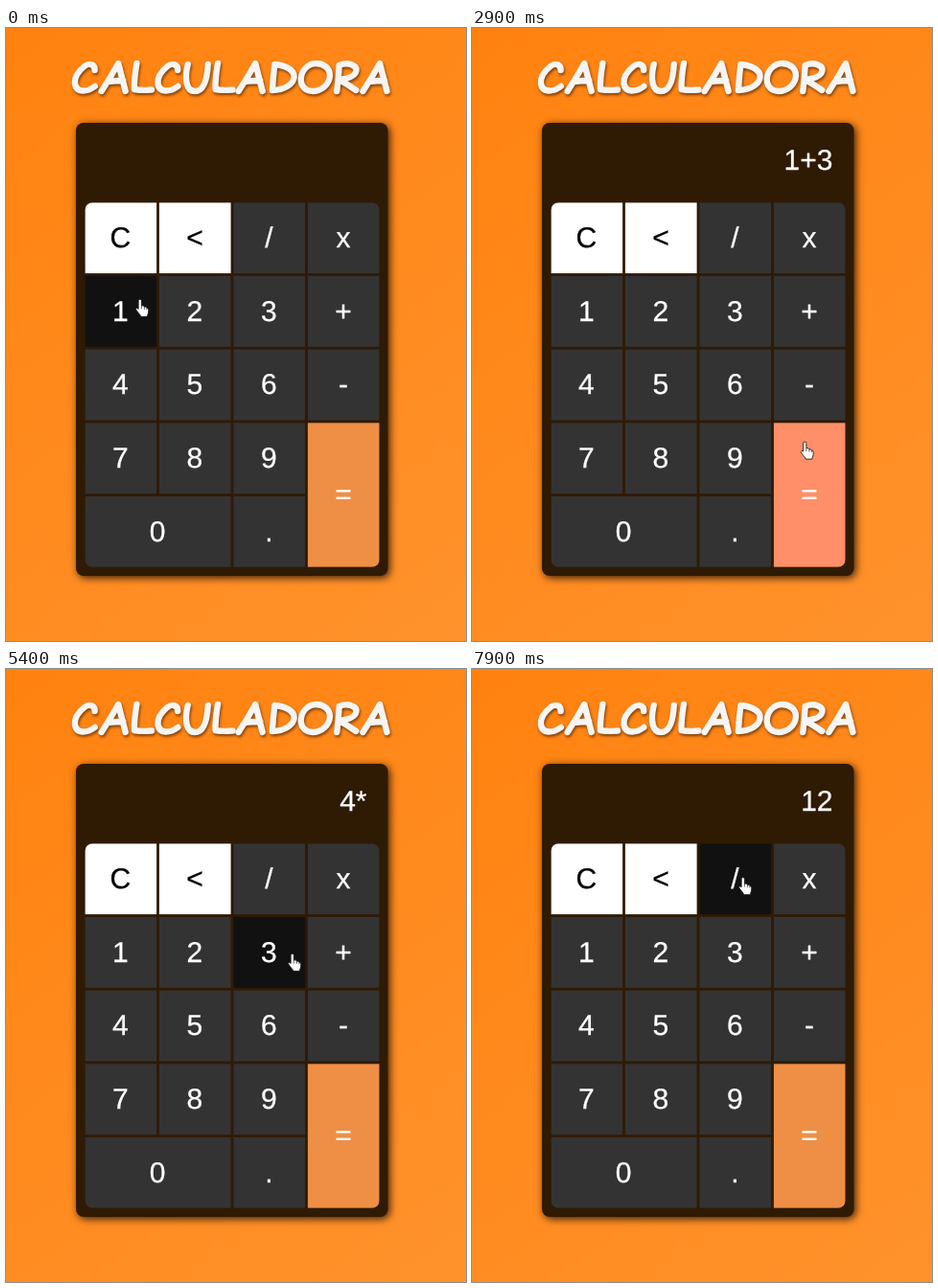
An HTML page for the animation above (8000 ms loop, 480 by 640 pixels).

```html
<!DOCTYPE html>
<html lang="pt">
<head>
<meta charset="utf-8">
<title>Calculadora</title>
<style>
  html, body { margin: 0; width: 100%; height: 100%; overflow: hidden; }
  body { background: linear-gradient(145deg, #ff820f, #ff922c); }
  svg { display: block; width: 480px; height: 640px; }
  text { font: 30px "Liberation Sans", Arial, sans-serif; color: #fff; fill: currentColor;
         stroke: currentColor; stroke-width: .3; text-anchor: middle; text-rendering: geometricPrecision; }
  #display { text-anchor: end; }
  #panel { fill: #2f1a04; filter: drop-shadow(2px 2px 4px rgba(0, 0, 0, .8)); }
  #title { fill: none; stroke: #f6f5f3; stroke-width: 6.4; stroke-linecap: round; stroke-linejoin: round;
           filter: drop-shadow(1px 2px 1.5px rgba(60, 25, 0, .65)); }
  #hand { fill: #fff; stroke: #1c1c1c; stroke-width: .9; stroke-linejoin: round; }
  #hand .folds { fill: none; stroke-width: .7; }
</style>
</head>
<body>
<svg viewBox="0 0 480 640">
  <defs><clipPath id="round"><rect x="82.4" y="182.2" width="307.4" height="380.6" rx="8"/></clipPath></defs>
  <g id="title" role="img" aria-label="CALCULADORA"></g>
  <rect id="panel" x="73" y="99" width="325.5" height="473" rx="8"/>
  <text id="display" x="376.5" y="147.7"></text>
  <g id="keys" clip-path="url(#round)"></g>
  <g id="hand">
    <path d="M-1.6 9.5V1a1.6 1.6 0 0 1 3.2 0V6q2.7-.4 3 1.2q2.2-.4 2.5 1.2q1.9-.1 1.9 2c0 4-1 4.8-1.5 7.1H1C.3 15-2.8 12.8-4.2 9.8Q-3.4 7.8-1.6 9.5Z"/>
    <path class="folds" d="M1.6 6V9.5M4.6 7.2V10M7.1 8.5V10.5"/>
  </g>
</svg>
<script>
const $ = id => document.getElementById(id);
function add(parent, tag, attrs) {
  const el = document.createElementNS("http://www.w3.org/2000/svg", tag);
  for (const name in attrs) el.setAttribute(name, attrs[name]);
  return parent.appendChild(el);
}

// Hand-lettered heading: advance width and pen stroke of each letter.
const letters = {
  C: [28.2, "M22 7C22 1 16-1 11 3C5 8 1 14 2 21C4 31 15 30 23 24"],
  A: [33.2, "M2 29Q11 14 18 0Q22 13 27 29M8 19Q16 18 24 18"],
  L: [25.2, "M4 0Q2 17 3 27Q11 28.5 21 27.5"],
  U: [31.2, "M4 1C1 17 4 29 13 29C23 29 25 15 25 1"],
  D: [31.2, "M5 1Q4 15 4 28C17 28 26 21 26 14C26 6 15 2 5 1"],
  O: [37.2, "M17 0C8 0 2 8 2 16C2 24 8 29 15 29C24 29 32 22 32 13C32 5 25 0 17 0Z"],
  R: [28.2, "M4 2Q4 17 3 29M4 2C13-2 23 2 22 8C21 14 13 16 5 17Q14 22 23 28"]
};
let penX = 71;
for (const c of "CALCULADORA") {
  const [advance, d] = letters[c];
  add($("title"), "path", { d, transform: `translate(${penX} 37) skewX(-3)` });
  penX += advance;
}

// A repeated label spans several cells.
const rows = ["C</x", "123+", "456-", "789=", "00.="];
const pitchX = 77.5, pitchY = 76.7, gap = 2.8;
const keys = {};
rows.forEach((labels, row) => [...labels].forEach((label, col) => {
  const key = keys[label] ??= { col, row };
  key.x = 82.4 + key.col * pitchX;
  key.y = 182.2 + key.row * pitchY;
  key.width = (col - key.col + 1) * pitchX - gap;
  key.height = (row - key.row + 1) * pitchY - gap;
}));
for (const label in keys) {
  const key = keys[label], { x, y, width, height } = key;
  const light = label === "C" || label === "<";
  key.colors = light ? ["#fff", "#ddd"] : label === "=" ? ["#ee8f45", "#ff8f68"] : ["#333", "#111"];
  key.rect = add($("keys"), "rect", { x, y, width, height });
  key.cx = x + width / 2;
  key.cy = y + height / 2;
  const text = add($("keys"), "text", { x: key.cx - .3, y: key.cy + 9.8 });
  text.textContent = label;
  if (light) text.style.color = "#000";
}

const TRAVEL = 500, PRESS_DELAY = 200;
const stop = (label, at, dx, dy, press = true) =>
  ({ label, at, press, x: keys[label].cx + dx, y: keys[label].cy + dy });
const stops = [
  stop("1", 0, 20, -12), stop("+", 1000, -6, -4), stop("3", 1900, 14, 0),
  stop("=", 2900, -5, -55), stop("/", 4300, -22, 19, false), stop("x", 4700, -9, 9),
  stop("3", 5400, 24, 2), stop("=", 6600, 9, -23), stop("/", 7700, 8, -1, false)
];

function cursorAt(t) {
  const i = stops.findLastIndex(s => s.at <= t);
  const from = stops[i], to = stops[i + 1] ?? from;
  const leave = Math.max(from.at, to.at - TRAVEL);
  const u = Math.max(0, (t - leave) / (to.at - leave || 1));
  const ease = Math.min(1, u * u * (3 - 2 * u));
  return [from.x + (to.x - from.x) * ease, from.y + (to.y - from.y) * ease];
}

function calculate(expression) {
  const [, a, op, b] = expression.match(/(\d+)(.)(\d+)/);
  return String(op === "+" ? +a + +b : a * b);
}

function readingAt(t) {
  return stops.filter(s => s.press && s.at + PRESS_DELAY <= t).reduce((shown, { label }) =>
    label === "=" ? calculate(shown) : shown + label.replace("x", "*"), "");
}

function draw(t) {
  const [x, y] = cursorAt(t);
  $("hand").setAttribute("transform", `translate(${x} ${y})`);
  $("display").textContent = readingAt(t);
  for (const k of Object.values(keys)) {
    const over = x >= k.x && x <= k.x + k.width && y >= k.y && y <= k.y + k.height;
    k.rect.setAttribute("fill", k.colors[+over]);
  }
}

const start = performance.now();
function tick() {
  const t = (performance.now() - start) % 8000;
  draw(Math.floor(t / 100) * 100);
  requestAnimationFrame(tick);
}
tick();
</script>
</body>
</html>
```
